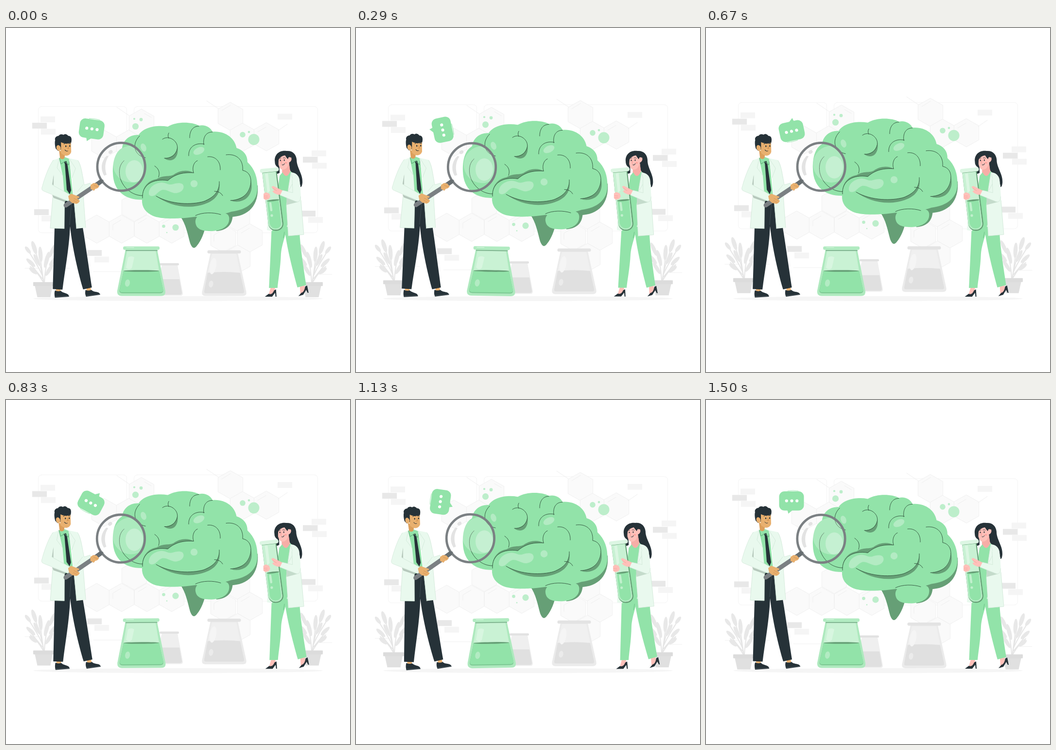
Recreate the animation shown at these times as an HTML page with a canvas. Size 708 by 708 pixels, loop 1540 ms.

```html
<!DOCTYPE html>
<html lang="en">
<head>
<meta charset="utf-8">
<title>Brain research</title>
<style>
html, body { margin: 0; width: 100%; height: 100%; overflow: hidden; background: #fff; }
canvas { display: block; width: 708px; height: 708px; }
</style>
</head>
<body>
<canvas id="stage" width="708" height="708"></canvas>
<script>
const ctx = document.getElementById('stage').getContext('2d');
const LOOP = 1540, STEP = 1000 / 24;
const GREEN = '#92e3a9', SHADE = '#669f76', LIGHT = '#b3ebc3', PALE = '#c8f1d3';
const INK = '#263238', COAT = '#e9f9ee', SEAM = '#cfe6d6', STEEL = '#7b8083';
const TAN = '#e8b06f', PINK = '#ffc0b9';

const fill = (d, color) => { ctx.fillStyle = color; ctx.fill(new Path2D(d)); };
const line = (d, color, width = 1) => {
  ctx.strokeStyle = color;
  ctx.lineWidth = width;
  ctx.stroke(new Path2D(d));
};
const oval = (x, y, rx, ry, color, deg = 0) => {
  ctx.beginPath();
  ctx.ellipse(x, y, rx, ry, deg * Math.PI / 180, 0, 7);
  ctx.fillStyle = color;
  ctx.fill();
};
const dot = (x, y, r, color) => oval(x, y, r, r, color);
const box = (x, y, w, h, r, color) => {
  ctx.beginPath();
  ctx.roundRect(x, y, w, h, r);
  ctx.fillStyle = color;
  ctx.fill();
};
function group(draw, { dy = 0, deg = 0, x = 0, y = 0 }) {
  ctx.save();
  ctx.translate(x, y + dy);
  ctx.rotate(deg * Math.PI / 180);
  ctx.translate(-x, -y);
  draw();
  ctx.restore();
}

function hexagon(x, y) {
  const d = `M${x},${y - 29}l25.7,14.5v29l-25.7,14.5l-25.7,-14.5v-29z`;
  fill(d, '#fafafa');
  line(d, '#f0f0f0');
}

function backdrop() {
  ctx.strokeStyle = '#f4f4f4';
  ctx.lineWidth = 1;
  for (const [x, w] of [[66.5, 182], [263.5, 378]]) {
    ctx.beginPath();
    ctx.roundRect(x, 161.5, w, 260, 7);
    ctx.stroke();
  }
  line('M39,494.5H67 M101,494.5H131 M180,501.5H250 M644,507H671', '#f1f1f1');
  [[462, 182], [487, 225], [536, 224], [279, 196], [202, 239], [253, 239],
   [264, 369], [187, 414], [238, 414], [290, 414], [341, 414],
   [476, 389], [447, 433], [502, 432], [477, 476]].forEach(p => hexagon(...p));
  line('M228,163L253,180 M413,150L437,166 M560,211L579,198 M444,170L462,159' +
       'M220,416V405L237,395 M272,402L289,392 M322,402L341,391 M428,439V426L445,416' +
       'M484,422L501,412 M285,176L299,184 M518,214L535,204', '#efefef');
  [[71, 182], [72, 207.5], [73, 386], [182, 470.5], [559, 176.5], [629, 252],
   [630, 277.5], [622, 389]].forEach(([x, y]) => box(x, y, 30, 12, 0, '#f5f5f5'));
  [[54, 195], [58, 373], [167, 457], [611, 265], [607, 376]]
    .forEach(([x, y]) => box(x, y, 30, 12, 0, '#e8e8e8'));
}

function plant() {
  line('M77,525C76,502 66,474 56,449 M75,510C67,490 56,476 44,455 M75,516C66,505 54,490 44,478' +
       'M76,522C69,510 60,498 50,491 M78,525C74,500 71,480 70,460 M79,525C80,500 85,475 93,458', '#e6e6e6', 2);
  [[58, 452, 4.5, 14, -18], [45, 457, 3.7, 9, -38], [51, 483, 4, 12, -47], [56, 500, 4, 10, -52],
   [64, 478, 4, 14, -28], [71, 466, 4.3, 16, -4], [84, 477, 4.3, 17, 15], [95, 459, 4, 15, 24],
   [89, 498, 4, 14, 32], [97, 480, 4, 12, 40]]
    .forEach(([x, y, rx, ry, a]) => oval(x, y, rx, ry, '#e8e8e8', a));
  fill('M59,529H96L91.5,554H64.5z', '#e0e0e0');
  box(56, 523, 43, 8, 1, '#dcdcdc');
}

function greyFlasks() {
  fill('M321,488H353L364,546Q364,551 359,551H309Q303,551 304,545z', '#efefef');
  fill('M310,517H357L362,545Q362,549 358,549H306z', '#e0e0e0');
  box(316, 484, 40, 4.5, 2, '#e2e2e2');
  fill('M421,463H477L494.5,543Q496,551 488,551.5H410Q402,551 403.5,543z', '#ebebeb');
  fill('M424,465H474L482,503H415z', '#f0f0f0');
  fill('M415,504Q449,500 482,504L490,541Q491,546 486,546H412Q407,546 408,541z', '#e0e0e0');
  oval(426, 490, 6.5, 17, '#f5f5f5', 10);
  oval(422, 527, 4.5, 7, '#ebebeb', 10);
  box(414.5, 457.5, 69, 6.5, 3, '#e3e3e3');
}

function brain() {
  fill('M358,387C370,402 374,425 379,443Q385,459 393,448C402,437 408,421 411,407L418,385z', SHADE);
  fill('M425,382L466,377C469,400 459,416 433,418z', SHADE);
  fill('M518,324C521,365 499,388 461,389L438,382L500,320z', SHADE);
  fill('M280,353.5C247,354 221,337 220,299C219,274 225,255 239,247C241,231 254,219 273,220' +
       'C283,204 310,199 333,203C352,192 382,193 397,201C409,198 421,204 425,213.5' +
       'C450,211 471,226 474.5,247C490,252 497,262 497,276C512,290 518,308 517.5,330' +
       'C517,356 498,374 464,378C443,385 418,390 390,388.5C350,394 316,393 302,386.5C288,380 279,369 280,353.5z', GREEN);
  fill('M390,401C388,383 410,377 436,382C452,378 462,383 459,397C456,412 438,418 421,418C403,418 392,414 390,401z', GREEN);

  fill('M281,350C279,323 303,309 333,314C350,299 367,297 386,298C374,291 357,293 345,302C335,307 324,302 310,311C291,314 279,330 281,350z', SHADE);
  fill('M309,346C340,364 383,364 407,357C427,349 440,337 439,318C444,348 421,361 395,366C364,372 332,363 309,346z', SHADE);
  fill('M462,355C493,352 507,334 503,312C511,334 499,351 487,355Q474,360 462,355z', SHADE);
  fill('M326,268C342,268 352,257 353,244C356,264 346,274 335,272Q329,271 326,268z', SHADE);

  line('M281,350C279,323 303,309 333,314C350,299 367,297 386,298 M309,346C340,364 383,364 407,357C427,349 440,337 439,316' +
       'M462,355C489,354 502,338 504,318C505,304 498,295 487,293C489,271 474,258 453,261' +
       'M322,229C335,219 355,233 352.5,248C350,261 339,269 326,268 M287,267C265,263 257,240 275,222' +
       'M335,216Q332,222 335,227 M378,226C378,211 385,202 397,202 M407,240C405,224 412,214 425,214' +
       'M376,263C375,246 389,235 408,239 M415,265C431,263 442,275 441,292 M386,298C382,285 388,275 394,273' +
       'M306,284C315,290 317,298 314,307 M429,336Q441,336 446,345 M390,386C404,379 427,379 442,384' +
       'M243,273C235,280 232,290 234,305C239,328 259,345 281,345', '#2c4c37', 0.9);

  fill('M294,339C295,327 307,319 320,318C329,318 332,323 341,322C350,319 358,318 363,321' +
       'C369,327 364,337 354,339C343,343 334,332 322,333C313,335 309,346 300,346Q293,345 294,339z', LIGHT);
  dot(387, 320.5, 7.3, LIGHT);
  oval(283, 246, 5.5, 8.5, LIGHT, -20);
  oval(397, 253, 12, 7, LIGHT, -25);
  oval(264, 295, 18, 23, LIGHT);
}

function bubbles() {
  [[266.5, 202.5, 6.6], [278, 188.5, 3.4], [264, 187, 2.1], [510, 229.5, 11.5], [487, 219.5, 5.8],
   [500, 214, 2.3], [349, 410.5, 6.6], [324.5, 408, 3.3], [331, 421, 1.3]]
    .forEach(([x, y, r]) => dot(x, y, r, '#bdeecb'));
}

function speech() {
  line('M168,187Q179,185.5 190,187', GREEN, 0.8);
  box(150.5, 188, 51, 39.5, 11, GREEN);
  fill('M167,225L169.5,234L180,225z', GREEN);
  for (const x of [165.8, 176.5, 187.2]) dot(x, 207.5, 3.1, '#fff');
}

function greenFlask() {
  fill('M246,456H311L328,541Q329.5,551 320,551.5H238Q228,551 229,541z', '#aee9be');
  fill('M249,459H308L315,499H242z', '#c9f2d4');
  fill('M242,500H315L323.5,539Q324.5,546 317,546H240Q232.5,546 233.5,539z', '#7cc792');
  fill('M242,500H315L323.5,538Q324,544 317,544H240Q233,544 234,538z', GREEN);
  oval(278.5, 500, 36.5, 1.8, SHADE);
  fill('M251,472Q258,468 264,472L259,494Q253,500 247,493z', '#d8f6e0');
  oval(250, 525, 5, 7.5, LIGHT, 10);
  line('M247,458H311', '#82b692', 2);
  box(241, 449.5, 75, 7, 3, '#b1ebc1');
  line('M248,451.8H263', '#d8f6e0', 1.2);
}

function manHead() {
  fill('M109,252L122,257L120,268Q116,272 111,268z', '#dca05c');
  fill('M111,238C112,229 132,230 133.5,236L134,255C131,265 119,265 113,257z', TAN);
  fill('M102,248C100,240 100,234 101,231C99,226 104,222 108,222C111,217 117,219 118,220' +
       'C123,216 127,221 128,222C134,222 136,227 134,236C126,239 119,238 113,235L113,250L107,253z', INK);
  oval(108, 247, 4.3, 6, TAN, -18);
  oval(123, 243.5, 1.2, 1.8, INK);
  oval(131, 243, 1.2, 1.8, INK);
  line('M119,239Q122,236 125,238 M129,238L133,238 M121,251Q124,255 127,253', INK, 1);
  line('M127,243L129,248L126,248', '#c98745', 1);
}

function magnifier() {
  // The glass tint covers only the upper right part of the lens.
  ctx.save();
  ctx.beginPath();
  ctx.arc(237, 285.5, 48, 0, 7);
  ctx.clip();
  dot(258, 280, 38, 'rgba(255,255,255,.24)');
  ctx.restore();
  fill('M207,263C195,275 194,291 202,304L207,302C202,288 204,274 211,264z', '#e3e3e3');
  oval(215, 255, 4.5, 3.5, '#e3e3e3', -35);
  ctx.beginPath();
  ctx.arc(237, 285.5, 49.2, 0, 7);
  ctx.strokeStyle = STEEL;
  ctx.lineWidth = 4.8;
  ctx.stroke();
  line('M198,315L181,327', STEEL, 6);
  line('M195,316L184,324', '#666d70', 9);
  line('M181,326L123,365', STEEL, 9);
}

function man() {
  fill('M103,535H113L112,544H103z M166,535L174,533L176,543H166z', TAN);
  fill('M101,540Q106,543 113,541C119,547 130,545 130,553L101,555Q99,547 101,540z', INK);
  fill('M164,539Q170,542 176,539C181,545 193,541 194,549L165,553Q162,546 164,539z', INK);
  line('M101,553L130,552 M165,551L194,548', '#59646a', 0.7);
  fill('M119,350H144L158,410C163,440 171,495 177,534L159,538C149,505 136,450 132,408' +
       'C130,455 121,500 116.5,538.5L96.5,537.5L100,412z', INK);
  line('M135,358L131,405', '#45535a', 0.8);
  fill('M108,268L119,265L130,269L139,356H119z', GREEN);
  fill('M119,275L124,274L126,279L134,334L131,342L125,333L121,280z', INK);
  line('M110,268L113,280L121,275L129,282L131,270', '#5fa878', 1);
  fill('M109,268L95,273L97,338L91,412L120,413L121,354L117,305z', COAT);
  fill('M129,268L148,272Q155,282 157,302L159,345L164,411L145,413L139,350L136,310z', COAT);
  line('M109,269L105,288L117,304 M130,269L143,289L136,308 M159,345L164,411 M97,338L91,412L120,413V358 M141,365L145,413', SEAM, 0.8);
  fill('M95,344L123,355L121,358L98,350z', '#b6c8bc');
  fill('M145,273C154,281 157,301 161,323L174,319L178,331L158,342Q149,346 147,337z', COAT);
  line('M148,273C154,281 157,301 161,323L174,319 M147,337L158,323', SEAM, 0.8);
  fill('M98,272C91,277 79,309 75,325Q71,334 78,336L129,357L133,344L97,323z', COAT);
  line('M98,306L95,323L133,344', SEAM, 0.8);
  line('M98,272C91,277 79,309 75,325Q71,334 78,336L129,357', SEAM, 0.7);
  fill('M98,302L95,322L98,324z', '#b6c8bc');
  magnifier();
  fill('M128,346L134,341L142,344L151,347L150,350L146,350L152,356L149,360L145,362L136,360L130,355z', TAN);
  fill('M174,323L180,319L187,320L192,326L188,330L184,331L181,335L174,331z', TAN);
  line('M140,351L148,355 M139,355L146,359 M181,324L189,327', '#ca8c4b', 0.7);
  manHead();
}

function tube() {
  fill('M527,297L557,294L571,402C572,420 545,424 540,405z', SHADE);
  fill('M527,297L555,294L568.5,402C570,417 546,421 540,404z', PALE);
  fill('M536.5,356L562.5,353L568.5,402C570,417 546,421 540,404z', LIGHT);
  fill('M538,356L561,353.5L566,402C567,414 547,418 543,403z', GREEN);
  oval(549.5, 354.8, 13, 1.8, SHADE, -6);
  fill('M533,300L539,299L543,335L538,340z', '#dbf6e2');
  line('M544,361L546,375', '#c1f0cd', 4.5);
  dot(547, 386, 2.6, '#c1f0cd');
  line('M528,298L557,295', SHADE, 1.2);
  group(() => box(522.5, 288.5, 39, 8, 4, '#dcf6e3'), { deg: -6, x: 542, y: 292.5 });
}

function womanHead() {
  fill('M553,274C552,260 563,251 577,253C590,252 597,260 598,271C598,288 611,300 610,318' +
       'Q609,328 606,327C605,311 591,304 584,292L581,268L562,272L563,298Q557,302 555,298L560,287Q553,284 553,274z', INK);
  fill('M568,284L582,276L585,296Q577,312 568,303z', '#f7aea7');
  fill('M561,270C562,260 578,260 580,267C588,260 591,274 582,277C580,290 572,294 565,290Q558,281 561,270z', PINK);
  fill('M557,279C555,261 572,254 588,262L585,267Q582,263 580,270Q577,267 574,262Q564,264 561,271L560,282z', INK);
  oval(564.5, 272.5, 1, 1.7, INK);
  oval(572.5, 272, 1, 1.7, INK);
  line('M563,268.5L566,267.5 M570,267.5Q573,266 575,268', INK, 0.8);
  line('M568,272L566,278L568,279', '#ec8d88', 0.8);
  line('M568,281.5Q571,283 573,279', INK, 1);
  oval(576, 277.5, 2.2, 1.5, '#ff9f99');
}

function woman() {
  fill('M545,534H554L553,545L547,548L541,548z M605,532L614,530L616,537L611,546L606,548z', PINK);
  fill('M533,553L541,547Q548,550 552,540L556,538L557,553H555L554,545L548,553z', INK);
  fill('M602,552L608,545Q614,544 616,532L620,530L623,545H621L618,539L612,549z', INK);
  fill('M547,405L604,412C604,440 612,490 618,529L600,534C592,505 580,460 575,425' +
       'C571,440 567,452 566,465C565,495 560,520 559,535H541.5z', GREEN);
  line('M573,420L571,432', '#65b77e', 0.8);
  womanHead();
  fill('M563,304L569,297Q577,313 585,295L597,302L592,365L576,415H548z', GREEN);
  fill('M540,377L551,375L548,418L537,416z', COAT);
  fill('M586,297Q601,298 604,312L607,350L613,425L581,428L577,366L581,330z', COAT);
  line('M586,298L581,330L577,366L581,428L613,425L607,355 M586,298L592,316L582,334', SEAM, 0.8);
  fill('M577,350L601,358L578,364z', '#c4dbcb');
  tube();
  fill('M530,341L535,338L542,341L544,347L541,352L534,354L530,351z', PINK);
  fill('M546,327L550,325L560,330L570,335L567,343L559,343L552,340L548,336L552,334z', PINK);
  line('M531,346L538,346 M532,350L538,349 M549,330L557,335', '#f39d97', 0.7);
  fill('M592,301C603,299 606,315 606.5,347Q606,361 596,357L564,344L569,334L590,339L589,316z', COAT);
  line('M589,312L590,339L569,334 M606.5,347Q606,361 596,357L564,344', SEAM, 0.8);
}

// Triangle wave running 0 → 1 → 0 → -1 → 0 over one turn.
const swing = p => p < 0.25 ? 4 * p : p < 0.75 ? 2 - 4 * p : 4 * p - 4;

function render(ms) {
  const step = Math.floor((ms % LOOP + 4.5) / STEP);
  const turn = Math.min(1, (8 + 10 * step) / 360);
  const dy = 0.4 - 9.3 * (1 - Math.abs(1 - 2 * turn));
  const deg = swing(turn);

  ctx.fillStyle = '#fff';
  ctx.fillRect(0, 0, 708, 708);
  ctx.lineCap = ctx.lineJoin = 'round';
  group(backdrop, { dy });
  oval(354, 557, 298, 5, '#f5f5f5');
  group(() => {
    plant();
    ctx.save();
    ctx.translate(708, 0);
    ctx.scale(-1, 1);
    plant();
    ctx.restore();
    greyFlasks();
    brain();
    bubbles();
  }, { dy });
  group(speech, { deg: 360 * turn, x: 176, y: 210 });
  group(greenFlask, { deg, x: 279, y: 500.5 });
  group(man, { deg, x: 181, y: 386 });
  group(woman, { deg, x: 572, y: 403 });
}

function tick() {
  render(performance.now());
  requestAnimationFrame(tick);
}
tick();
</script>
</body>
</html>
```
